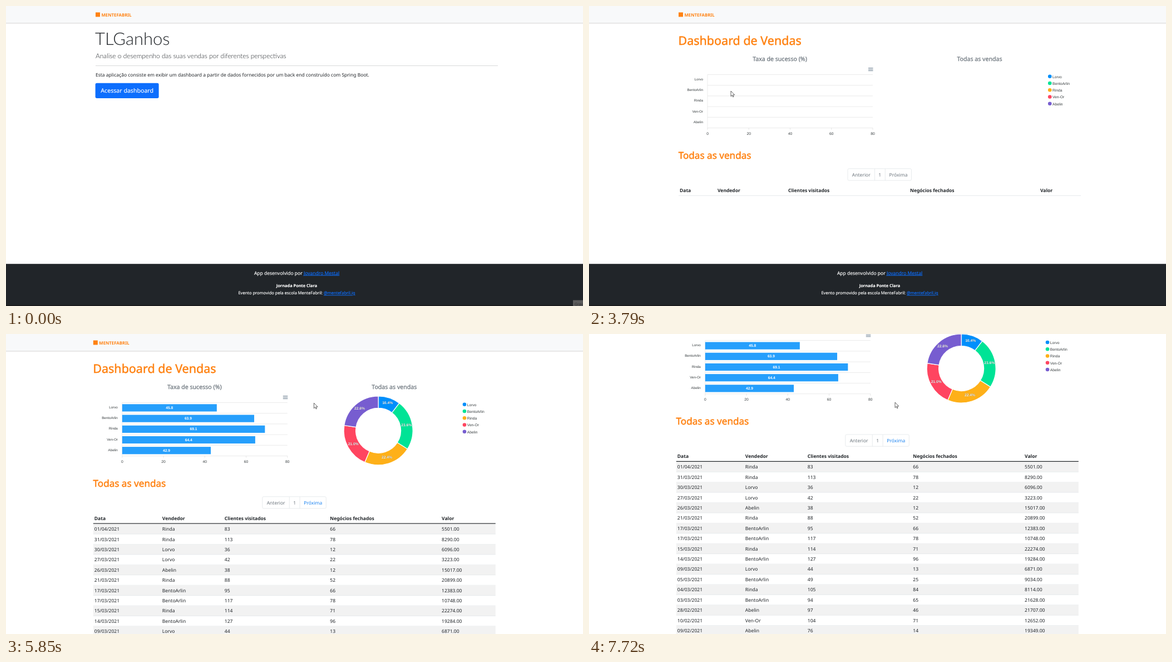
Write an HTML page that moves like this. It is 1037 px wide and 540 px high and loops after 8000 ms.

```html
<!DOCTYPE html>
<html lang="pt-BR">
<head>
<meta charset="utf-8">
<title>Dashboard de Vendas</title>
<style>
  html, body { margin: 0; width: 100%; height: 100%; overflow: hidden; background: #fff; }
  svg { display: block; width: 1037px; height: 540px; font: 8.5px "Noto Sans", "Open Sans", sans-serif; fill: #212529; text-rendering: geometricPrecision; }
  .chart { font-family: "Liberation Sans", Arial, sans-serif; font-size: 6.7px; fill: #373d3f; }
  .mid { text-anchor: middle; }
  .value { font-weight: 700; fill: #fff; text-anchor: middle; }
  .shadow { filter: drop-shadow(.5px .5px .5px rgba(0,0,0,.6)); }
  .light { font-family: Lato, "Open Sans", sans-serif; font-weight: 300; }
  .h { fill: #ff8212; stroke: #ff8212; stroke-width: .5; }
  .sub { font-size: 10.6px; fill: #6c757d; stroke: #6c757d; stroke-width: .25; text-anchor: middle; }
  .white { fill: #fff; stroke: #fff; stroke-width: .15; text-anchor: middle; }
  .link { fill: #0d6efd; stroke: #0d6efd; text-decoration: underline; }
  .cursor { fill: #fff; stroke: #222; stroke-width: .7; stroke-linejoin: round; }
</style>
</head>
<body>
<svg id="stage" width="1037" height="540"></svg>
<script>
const LOOP = 8000;
const names = ['Lorvo', 'BentoArlin', 'Rinda', 'Ven-Or', 'Abelin'];
const success = [45.8, 63.9, 69.1, 64.4, 42.9];
const share = [10.4, 23.6, 22.4, 21.0, 22.6];
const colors = ['#008ffb', '#00e396', '#feb019', '#ff4560', '#775dd0'];
const heads = ['Data', 'Vendedor', 'Clientes visitados', 'Negócios fechados', 'Valor'];
const emptyCols = [163, 231, 358, 577, 811];
const fullCols = [163, 285, 397, 586.5, 787.3];

// day/month, seller index, visits, deals, amount
const sales = `01/04 2 83 66 5501|31/03 2 113 78 8290|30/03 0 36 12 6096|27/03 0 42 22 3223
26/03 4 38 12 15017|21/03 2 88 52 20899|17/03 1 95 66 12383|17/03 1 117 78 10748
15/03 2 114 71 22274|14/03 1 127 96 19284|09/03 0 44 13 6871|05/03 1 49 25 9034
04/03 2 105 84 8114|03/03 1 94 65 21628|28/02 4 97 46 21707|10/02 3 104 71 12652
09/02 4 76 14 19349`.split(/[|\n]/).map(line => line.split(' '));

const axisX = 213, unit = 297 / 80, gridY = 123.5, rowH = 19.2;
const pie = { x: 673.3, y: 173.8, outer: 62, inner: 40.5 };

const text = (x, y, body, attrs = '') => `<text x="${x}" y="${y}" ${attrs}>${body}</text>`;
const rect = (x, y, w, h, fill, attrs = '') => `<rect x="${x}" y="${y}" width="${w}" height="${h}" fill="${fill}" ${attrs}/>`;
const line = (x1, y1, x2, y2, stroke, w = .6) => `<path d="M${x1} ${y1}L${x2} ${y2}" stroke="${stroke}" stroke-width="${w}"/>`;
const dot = (x, y, fill) => `<circle cx="${x}" cy="${y}" r="3.3" fill="${fill}"/>`;
const polar = (r, turn) => {
  const a = turn * 2 * Math.PI;
  return [pie.x + r * Math.sin(a), pie.y - r * Math.cos(a)];
};
const shareStart = i => share.slice(0, i).reduce((a, b) => a + b, 0) / 100;

function landing() {
  return text(160, 70, 'TLGanhos', 'class="light" font-size="31"')
    + text(161, 93.6, 'Analise o desempenho das suas vendas por diferentes perspectivas', 'class="light" font-size="11.9"')
    + line(161, 107.5, 884, 107.5, '#cfd0d1', .8)
    + text(161, 126.8, 'Esta aplicação consiste em exibir um dashboard a partir de dados fornecidos por um back end construído com Spring Boot.')
    + rect(160.6, 138.8, 114, 27.2, '#0d6efd', 'rx="2.7" id="button"')
    + text(217.7, 156.3, 'Acessar dashboard', 'class="white" font-size="10.6"');
}

function barChart() {
  let out = '';
  for (let i = 0; i < 6; i++) out += line(axisX, gridY + i * rowH, 510, gridY + i * rowH, '#dcdcdc');
  out += line(axisX, gridY, axisX, 219.5, '#e0e0e0');
  for (let i = 0; i < 5; i++) {
    const x = axisX + i * 20 * unit;
    out += line(x, 219.5, x, 222.8, '#d5d5d5') + text(x, 231.6, i * 20, 'class="mid"');
    out += text(205, 134 + i * rowH, names[i], 'text-anchor="end" font-size="6.2"');
  }
  out += names.map(() => '<rect class="bar" x="213" fill="#269ffc"/>').join('');
  success.forEach((v, i) => out += text(axisX + v * unit / 2, 135 + i * rowH, v, 'class="value"'));
  for (let i = 0; i < 3; i++) out += line(502, 111.7 + i * 2.4, 510.5, 111.7 + i * 2.4, '#6e8192', 1);
  return out;
}

function donut() {
  let out = colors.map(c => `<path class="slice" fill="${c}" stroke="#fff" stroke-width="1.2"/>`).join('');
  out += '<g id="shares" class="shadow">';
  share.forEach((v, i) => {
    const [x, y] = polar(51.5, shareStart(i) + v / 200);
    out += text(x, y + .8, v.toFixed(1) + '%', 'class="value"');
  });
  out += '</g>';
  names.forEach((n, i) => out += dot(828.2, 126.8 + i * 12.25, colors[i]) + text(833, 129.6 + i * 12.25, n));
  return out;
}

function pagination() {
  return rect(465, 292.8, 114.5, 21.2, '#fff', 'rx="2.2" stroke="#dee2e6" stroke-width=".7"')
    + line(513.5, 293, 513.5, 314, '#dee2e6', .7) + line(532.3, 293, 532.3, 314, '#dee2e6', .7)
    + '<g class="mid" fill="#6c757d">' + text(489.3, 306.5, 'Anterior') + text(522.8, 306.5, '1')
    + text(556, 306.5, 'Próxima', 'id="next"') + '</g>';
}

function table() {
  let out = heads.map((h, i) => text(emptyCols[i], 335, h, 'class="head" font-weight="700"')).join('');
  out += '<path id="rule" d="M161 341.2H884"/><g id="rows">';
  sales.forEach(([day, seller, visits, deals, amount], i) => {
    const y = 341.9 + i * 18.42;
    if (i % 2 === 0) out += rect(161, y, 723, 18.4, '#f2f2f2');
    out += line(161, y + 18.2, 884, y + 18.2, '#dee2e6');
    [day + '/2021', names[seller], visits, deals, amount + '.00']
      .forEach((cell, c) => out += text(fullCols[c], y + 12.2, cell));
  });
  return out + '</g>';
}

function tooltip() {
  return '<g id="tip" class="chart"><g style="filter:drop-shadow(1px 1px 2px rgba(0,0,0,.25))">'
    + rect(373.5, 113, 77, 40, '#fff', 'rx="2.5"') + '</g>'
    + '<path d="M373.5 131V115.5q0-2.5 2.5-2.5H448q2.5 0 2.5 2.5V131z" fill="#eceff1"/>'
    + line(373.5, 131, 450.5, 131, '#ddd')
    + text(377.3, 124.6, names[1]) + dot(382.8, 141.5, '#008ffb')
    + text(391.5, 144, '% Success:') + text(431, 144, '63.9', 'font-weight="700"') + '</g>';
}

function footer() {
  return rect(0, 464.2, 1037, 75.8, '#212529') + rect(0, 538, 1037, 2, '#1b1c1e')
    + '<g class="white">'
    + text(522.5, 483.5, 'App desenvolvido por <tspan class="link">Jovandro Mestal</tspan>')
    + text(522.5, 506, 'Jornada Ponte Clara', 'font-size="7.4" font-weight="700"')
    + text(522.5, 519.4, 'Evento promovido pela escola MenteFabril: <tspan class="link">@mentefabril.ig</tspan>', 'font-size="7.5"')
    + '</g>';
}

document.getElementById('stage').innerHTML = `
  <defs><linearGradient id="fade" x2="0" y2="1"><stop stop-opacity=".13"/><stop offset="1" stop-opacity="0"/></linearGradient></defs>
  ${rect(0, 0, 1037, 540, '#fff')}
  <g id="bar-top">${rect(0, 30, 1037, 3, 'url(#fade)')}${rect(0, -5, 1037, 35, '#f8f9fa')}
    <g id="brand">${rect(161, 11.5, 8, 8, '#ff8212')}
    ${text(171.5, 18.6, 'MENTEFABRIL', 'font-size="7.8" font-weight="700" style="fill:#ff8212"')}</g></g>
  <g id="landing">${landing()}</g>
  <g id="dash">
    ${text(160.5, 69.6, 'Dashboard de Vendas', 'class="h" font-size="21.5"')}
    ${text(343, 99.4, 'Taxa de sucesso (%)', 'class="sub"')}
    ${text(702, 99.4, 'Todas as vendas', 'class="sub"')}
    <g class="chart">${barChart()}${donut()}</g>
    ${text(160.7, 275, 'Todas as vendas', 'class="h" font-size="17.1"')}
    ${pagination()}${table()}${tooltip()}
  </g>
  <g id="footer">${footer()}</g>
  <g id="status" class="chart">${rect(0, 529, 90, 11, '#35363a')}${text(4, 537, 'localhost:3000/dashboard', 'style="fill:#c4c7cb"')}</g>
  <g id="corner" class="chart">${rect(1019, 529.5, 18, 10.5, '#5c5c5c')}${text(1022, 539, 'Grav', 'style="fill:#2e2e2e"')}</g>
  <g id="pointer" class="cursor">
    <path id="arrow" d="M0 0V9.6L2.2 7.5 3.7 10.8 5.1 10.2 3.7 7H6.7Z"/>
    <path id="hand" d="M-1 .6a1 1 0 0 1 2 0V4l4 .8q1 .3 .8 1.4l-.7 4.2H.2L-2.6 6q.2-1.2 1.6-.4z"/>
  </g>`;

const $ = id => document.getElementById(id);
const all = cls => [...document.getElementsByClassName(cls)];
const show = (id, on) => $(id).style.display = on ? '' : 'none';
const clamp = v => Math.min(1, Math.max(0, v));
const mix = (a, b, p) => a + (b - a) * p;
const easeOut = p => 1 - (1 - p) ** 3;
const easeInOut = (p, power) => (p < .5 ? (2 * p) ** power : 2 - (2 - 2 * p) ** power) / 2;

// Progress that jumps n times, first at `start` and last at `end`.
const stepped = (t, start, end, n) =>
  t < start ? 0 : Math.min(n, Math.floor((t - start + 1) / (end - start) * (n - 1)) + 1) / n;

const moves = [
  [260, 1030, 12, 350, 198], [1100, 1640, 9, 300, 175], [1990, 2050, 2, 301, 171],
  [2450, 2860, 7, 255, 153], [4600, 5090, 8, 434, 161], [5160, 5370, 4, 628, 150],
  [5430, 5990, 9, 550, 123]
];

function pointerAt(t) {
  return moves.reduce(([x, y], [start, end, n, toX, toY]) => {
    const p = easeInOut(stepped(t, start, end, n), 3);
    return [mix(x, toX, p), mix(y, toY, p)];
  }, [987, 532]);
}

function drawBars(t) {
  const settle = easeOut(clamp((t - 4390) / 350));
  all('bar').forEach((bar, i) => {
    const width = success[i] * unit, top = 126.3 + i * rowH;
    let y = top, h = 13.2, w = width * easeOut(clamp((t - 4390 - i * 60) / 350));
    if (i < 2) {
      y = mix([123.3, 151.7][i], top, settle);
      h = mix([9.7, 12.3][i], 13.2, settle);
      w = t < 4390 ? 0 : mix([184, 218][i], width, settle);
    }
    bar.setAttribute('y', y);
    bar.setAttribute('height', h);
    bar.setAttribute('width', w);
  });
}

function drawDonut(t) {
  const sweep = easeOut(clamp((t - 3860) / 470));
  all('slice').forEach((slice, i) => {
    const a = Math.min(shareStart(i), sweep), b = Math.min(shareStart(i) + share[i] / 100, sweep);
    slice.setAttribute('d', b <= a ? '' :
      `M${polar(pie.outer, a)}A62 62 0 0 1 ${polar(pie.outer, b)}L${polar(pie.inner, b)}A40.5 40.5 0 0 0 ${polar(pie.inner, a)}Z`);
  });
  show('shares', sweep === 1);
}

function update(t) {
  const onDash = t >= 3790, loaded = t >= 4460;
  const shift = loaded ? -4.2 : 0;
  const scroll = 56 * easeInOut(stepped(t, 6920, 7120, 4), 4) + 55.8 * easeInOut(stepped(t, 7580, 7720, 3), 4);
  const [x, y] = pointerAt(t);
  const overButton = !onDash && x < 274.5 && y < 166;
  const overBar = t >= 4600 && t < 5160;
  const fromCentre = Math.hypot(x - pie.x - shift, y - pie.y);
  const overSlice = loaded && fromCentre > pie.inner && fromCentre < pie.outer;

  show('landing', !onDash);
  show('dash', onDash);
  show('footer', !loaded);
  show('rows', loaded);
  show('tip', overBar);
  show('status', overButton);
  show('corner', t < 70);
  show('pointer', t >= 260);
  show('hand', overButton);
  show('arrow', !overButton);

  $('pointer').setAttribute('transform', `translate(${x} ${y})`);
  $('bar-top').setAttribute('transform', `translate(0 ${-scroll})`);
  $('brand').setAttribute('transform', `translate(${shift} 0)`);
  $('dash').setAttribute('transform', `translate(${shift} ${-scroll})`);
  $('button').setAttribute('fill', overButton ? '#0b5ed7' : '#0d6efd');
  $('next').setAttribute('fill', t >= 4600 ? '#1a82f0' : '#6c757d');
  $('rule').setAttribute('stroke', loaded ? '#212529' : '#dee2e6');
  $('rule').setAttribute('stroke-width', loaded ? 1.2 : .8);
  all('head').forEach((h, i) => h.setAttribute('x', (loaded ? fullCols : emptyCols)[i]));

  drawBars(t);
  drawDonut(t);
  all('bar')[1].setAttribute('fill', overBar ? '#74c4fc' : '#269ffc');
  all('slice')[4].setAttribute('fill', overSlice ? '#9a87dc' : colors[4]);
}

const begun = performance.now();
function frame() {
  update((performance.now() - begun) % LOOP);
  requestAnimationFrame(frame);
}
frame();
</script>
</body>
</html>
```
